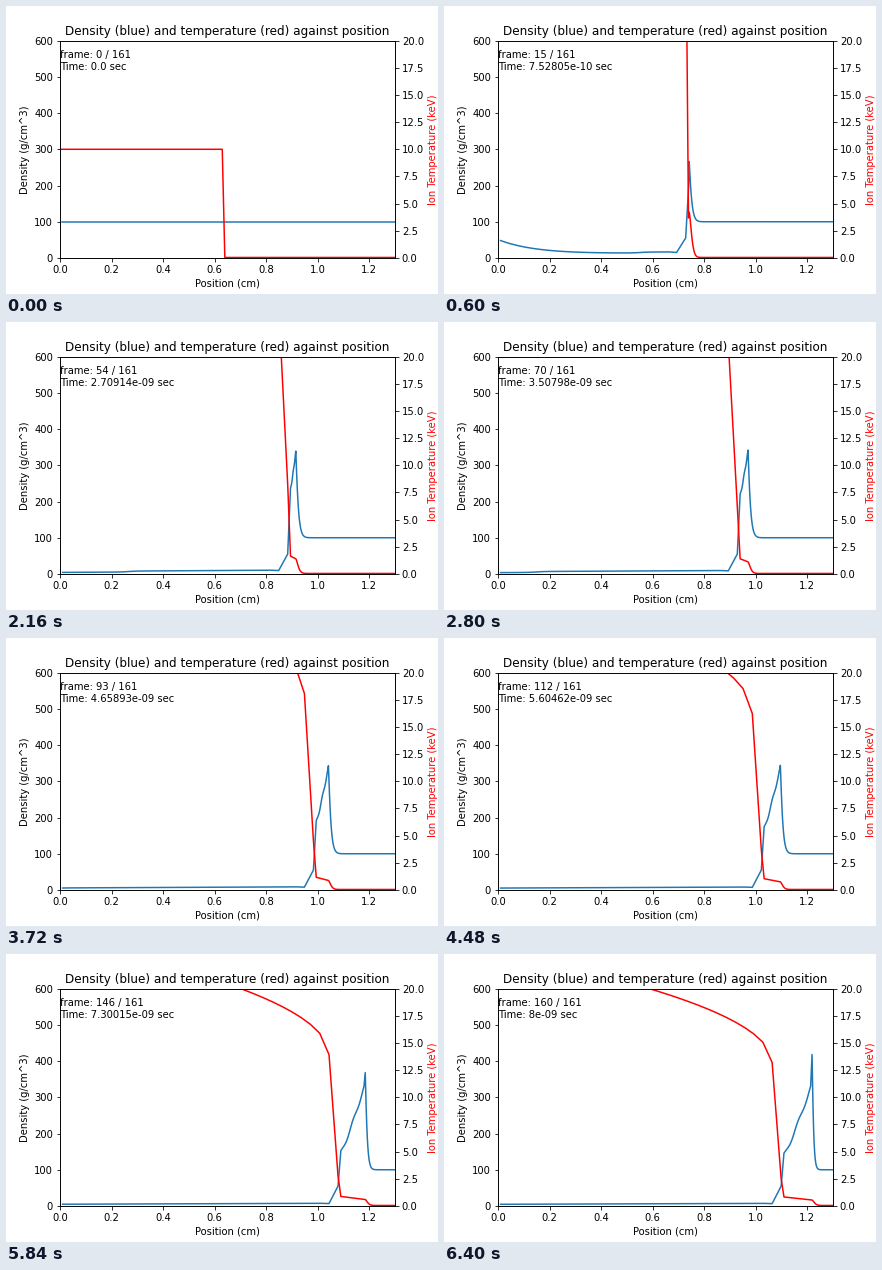
A matplotlib script for the animation above (6.44 s loop, 432x288 px).

```python
import numpy as np
import matplotlib.pyplot as plt
from matplotlib.animation import FuncAnimation

FRAMES = 161
LAST = FRAMES - 1
AMBIENT, COLD = 100, 0.05   # undisturbed density and temperature
HOT_EDGE = 0.635            # initial boundary of the hot core
ZONE = 0.036                # width of one core zone

plt.rcParams["font.family"] = "DejaVu Sans"


def initial():
    density = [0.006, 1.4], [AMBIENT, AMBIENT]
    heat = [0.006, 0.63, 0.64, 1.4], [10, 10, COLD, COLD]
    return density, heat


def landmarks(n):
    """Positions of the shell's foot, kink, shoulder and peak."""
    peak = max(0.64, 0.60 + 0.0265 * n ** 0.621)
    shoulder = peak - 0.109 * (n / LAST) ** 1.54
    return shoulder - 0.046, shoulder - 0.011, shoulder, peak


def density_curve(n):
    foot, kink, shoulder, peak = landmarks(n)
    late = (n / LAST) ** 6
    top = 100 + 243 * (1 - np.exp(-n / 13))
    spike = 75 * late ** 2

    # Core: gentle slope with a step that travels inwards
    edge = 13 * (30 / n) ** 0.35
    core = np.linspace(0.01, foot - 0.03, 60)
    step = 0.66 - 0.0073 * n
    inner = edge * (0.65 + 0.35 * core / foot)
    inner -= 1.25 * (1 - np.tanh((core - step) / 0.03))

    # The first rarefaction empties the dense core from outside in
    x_in = np.append(core, [foot, kink])
    inner = np.append(inner, [0.9 * edge, 55])
    since = np.clip(n - (HOT_EDGE - x_in) / 0.05, 0, None)
    inner += (AMBIENT - inner) * np.exp(-since / 3)

    # Shell: uneven climb from shoulder to peak
    f = np.linspace(0, 1, 21)
    low = min(146 * np.sqrt(LAST / n), 0.7 * top)
    climb = low + (top - low) * (f ** 1.15 - 0.05 * np.sin(2 * np.pi * f) ** 2)
    climb += spike * np.clip(20 * f - 19, 0, 1)

    d = np.append(np.linspace(0.002, 0.06, 30), 1)
    width = 0.0095 - 0.0037 * late
    tail = AMBIENT + (climb[-1] - AMBIENT) * np.exp(-(d / width) ** 1.15)
    x = np.concatenate([x_in, shoulder + (peak - shoulder) * f, peak + d])
    return x, np.concatenate([inner, climb, tail])


def heat_curve(n):
    marks = np.array(landmarks(n))
    foot, peak = marks[0], marks[-1]

    # Each landmark cools as a power of time
    cooling = np.array([0.58, 1.1, 0.63, 0.86])
    temp = np.array([13.2, 2.5, 0.83, 0.55]) * (LAST / n) ** cooling

    back = np.arange(ZONE, foot, ZONE)[::-1]
    core = temp[0] * (1 + 0.745 * np.sqrt(back))
    d = np.append(np.linspace(0.002, 0.06, 30), 1)
    ahead = COLD + (temp[-1] - COLD) * np.exp(-(d / 0.012) ** 1.5)
    x = np.concatenate([foot - back, marks, peak + d])
    return x, np.concatenate([core, temp, ahead])


def caption(n):
    # The solver stops slightly past each multiple of 50 ps
    over = np.interp(n, [0, 30, 54, 70, 93, 131, 160],
                     [0, 561, 914, 798, 893, 32, 0])
    t = float(f"{(n * 5000 + over) * 1e-14:.6g}")
    return f"frame: {n} / {FRAMES}\nTime: {t} sec"


fig, ax = plt.subplots(figsize=(6, 4), dpi=72)
fig.subplots_adjust(left=0.125, right=0.9, bottom=0.125, top=0.88)
ax.set(xlim=(0, 1.3), ylim=(0, 600), xlabel="Position (cm)",
       ylabel="Density (g/cm^3)",
       title="Density (blue) and temperature (red) against position")
ax2 = ax.twinx()
ax2.set_ylim(0, 20)
ax2.set_ylabel("Ion Temperature (keV)", color="red")
rho_line, = ax.plot([], [], color="tab:blue")
temp_line, = ax2.plot([], [], color="red")
label = ax.text(0, 520, "")


def draw(n):
    density, heat = (density_curve(n), heat_curve(n)) if n else initial()
    rho_line.set_data(*density)
    temp_line.set_data(*heat)
    label.set_text(caption(n))
    return rho_line, temp_line, label


anim = FuncAnimation(fig, draw, frames=FRAMES, interval=40,
                     repeat=True, repeat_delay=0)
plt.show()
```
